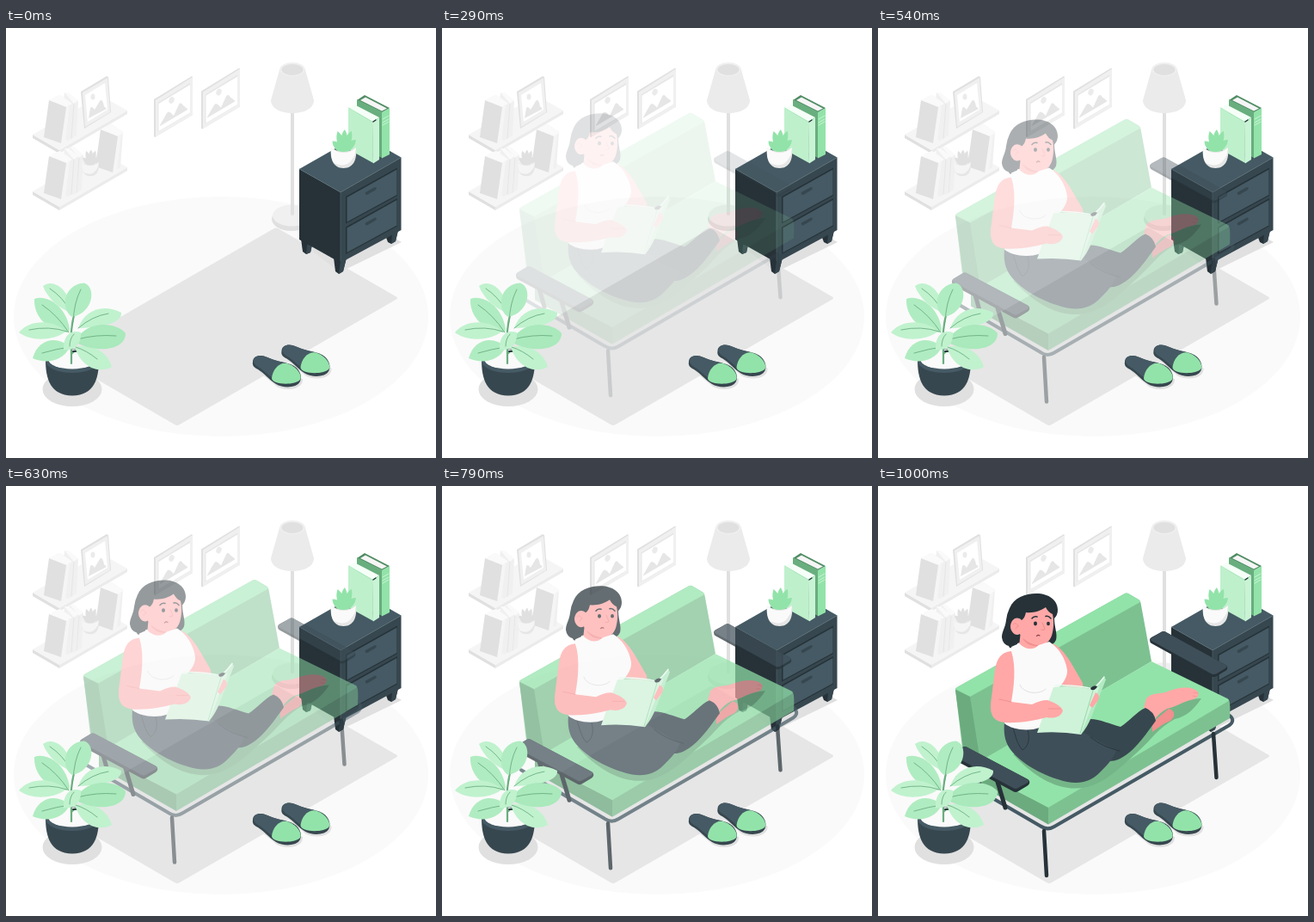
An HTML page with a canvas that plays this animation: 500 by 500 pixels, repeating every 1040 ms.

```html
<!DOCTYPE html>
<html lang="en">
<head>
<meta charset="utf-8">
<title>Reading on the sofa</title>
<style>
html, body { margin: 0; width: 100%; height: 100%; overflow: hidden; background: #fff; }
canvas { display: block; width: 500px; height: 500px; }
</style>
</head>
<body>
<canvas id="stage"></canvas>
<script>
const SIZE = 500, LOOP = 1040, FPS = 24, LAST = 24, DROP = 30;
const scale = window.devicePixelRatio || 1;
const stage = document.getElementById('stage');
const layer = document.createElement('canvas');
for (const c of [stage, layer]) c.width = c.height = SIZE * scale;
const view = stage.getContext('2d'), group = layer.getContext('2d');
let g = view;

const INK = '#263238', SLATE = '#37474f', STEEL = '#455a64', DENIM = '#3f4f59';
const GREEN = '#92e3a9', MOSS = '#7dc191', SKIN = '#ffa8a7', BLUSH = '#f28f8f';

function fill(d, color) {
  g.fillStyle = color;
  g.fill(new Path2D(d));
}

function line(d, color, width = 1) {
  g.strokeStyle = color;
  g.lineWidth = width;
  g.lineCap = g.lineJoin = 'round';
  g.stroke(new Path2D(d));
}

function oval(x, y, rx, ry, color, turn = 0) {
  g.fillStyle = color;
  g.beginPath();
  g.ellipse(x, y, rx, ry, turn, 0, Math.PI * 2);
  g.fill();
}

function at(x, y, draw) {
  g.save();
  g.translate(x, y);
  draw();
  g.restore();
}

// ---- wall ----

function picture() {
  fill('M172 83 L216 56 L217 57 V101 L173 127 L172 126Z', '#e0e0e0');
  fill('M174 84 L217 57 V101 L174 126.5Z', '#f0f0f0');
  fill('M176.5 87 L214 64 V99 L176.5 121Z', '#e6e6e6');
  fill('M177.5 88 L214 66 V98.5 L177.5 120Z', '#fff');
  fill('M179 113 L187 99 Q189 96 192 99 L195 102 L201 89 Q203 85 206 90 L211 94 V95 L179 114Z', '#e6e6e6');
  oval(192.5, 84, 3, 4, '#ebebeb', 0.4);
}

function shelf() {
  fill('M31 124 L62 142 V146 L31 128Z', '#e0e0e0');
  fill('M62 142 L141 96 V100 L62 146Z', '#ebebeb');
  fill('M31 124 L110 78.5 L141 96 L62 142Z', '#f5f5f5');
}

function farBook() {
  fill('M68 75 L84 85 L82 125 L72 131 L63 125Z', '#f0f0f0');
  fill('M68 75 L73 75 L84 84 L79 88Z', '#fafafa');
  line('M79 88 L76 128', '#e6e6e6');
}

function books() {
  fill('M57 80 L63 78 L76 87 L73 128 L64 133 L51 125Z', '#f0f0f0');
  fill('M57 80 L63 78 L76 87 L70 91Z', '#fafafa');
  fill('M50 84 L57 80 L77 88 L70 92Z', '#fafafa');
  fill('M70 92 L74 89 L69 131 L64 134Z', '#f5f5f5');
  fill('M50 84 L70 92 L64 134 L44 127Z', '#e0e0e0');
}

function wall() {
  picture();
  at(55, -9.5, picture);
  shelf();
  farBook();
  books();
  fill('M87 74 L117 56 L119 57 L122 98 L91 117Z', '#e0e0e0');
  fill('M89 75 L118 58 L121 98 L92 115Z', '#f0f0f0');
  fill('M92 78 L115 64 L118 95 L95 109Z', '#fff');
  fill('M96 105 L98 93 Q100 90 103 95 L109 85 Q112 81 114 91 L117 94Z', '#e6e6e6');
  oval(101, 80, 2.5, 3.5, '#ebebeb');
  at(0, 66, shelf);
  at(60, 34, books);
  at(6, 63, farBook);
  at(0, 65, farBook);
  at(0, 65, books);
  succulent(98, 162, 0.68, '#e0e0e0', '#f5f5f5', '#e6e6e6');
}

// ---- furniture ----

function succulent(x, y, size, leaf, pot, shade) {
  g.save();
  g.translate(x, y);
  g.scale(size, size);
  for (const [turn, len] of [[-0.8, 18], [0.8, 20], [-0.28, 25], [0.36, 26], [0.05, 26]]) {
    g.save();
    g.translate(0, -4);
    g.rotate(turn);
    fill(`M-2 3 C-6 ${-len * 0.4} -4 ${-len * 0.8} 0 ${-len} C4 ${-len * 0.8} 6 ${-len * 0.4} 2 3Z`, leaf);
    g.restore();
  }
  fill('M-14.5 -9 C-16 4 -12 15 0 15 C12 15 16 4 14.5 -9 Q0 1 -14.5 -9Z', shade);
  fill('M-14.5 -9 C-15 -1 -14 5 -11 9 C-3 13 5 12 9 6 L13 0 L14.5 -9 Q8 -3 0 -3 Q-8 -3 -14.5 -9Z', pot);
  g.restore();
}

function lamp() {
  oval(332, 222, 23, 14, '#e0e0e0');
  oval(332, 218, 22, 12.5, '#f0f0f0');
  fill('M331 90 H335 V217 Q333 219 331 217Z', '#e0e0e0');
  fill('M318.5 47 L308 84 C308 104 358 104 358 84 L347.5 47Z', '#ebebeb');
  oval(333, 48, 14.5, 8, '#f0f0f0');
  oval(333, 48.5, 12.5, 6.5, '#e0e0e0');
}

function drawer() {
  fill('M395 196 L455 162.5 V195 L395 227.5Z', INK);
  fill('M396.5 197 L454.5 164.5 V194 L396.5 225.5Z', STEEL);
  fill('M418 191 L429 185 Q432 185 430 188 L420 194 Q417 194 418 191Z', SLATE);
}

function dresser() {
  fill('M344 250 L388 284 L460 249 L412 222Z', '#e0e0e0');
  fill('M343 245 L356 252 L354 261 L349 263 L345 260Z', INK);
  fill('M350 252 L356 252 L354 261 L349 263Z', SLATE);
  fill('M381 267 H396 L392 283 L387 286 L383 283Z', INK);
  fill('M389 270 L396 267 L392 283 L387 286Z', SLATE);
  fill('M441 241 L456 234 L453 248 L448 251 L444 249Z', INK);
  fill('M449 240 L456 236 L453 248 L448 251Z', SLATE);
  fill('M341 164 L389 191 V273 L341 246Z', INK);
  fill('M389 191 L459.5 150.5 V235 L389 273Z', SLATE);
  fill('M341 164 L412 123.5 L459.5 150.5 L389 191Z', STEEL);
  line('M341.5 164 L389 191 L459 151 M389 191 V271', '#54686f', 0.6);
  drawer();
  at(0, 35.5, drawer);

  fill('M408 84 L437 98 V151 L408 136Z', '#69ae7e');
  fill('M437 98 L446 93 V147 L437 151.5Z', GREEN);
  fill('M408 84 L417 78 L446 93 L437 98Z', '#4f8c63');
  fill('M412 84 L418 80.5 L443 93.5 L437 96.5Z', '#f5f5f5');
  line('M408.5 84 L437 98', '#69ae7e', 1.2);
  line('M438 106 L445 102 M438 110 L445 106 M438 113 L445 109', '#d0f5da', 0.9);
  fill('M398 93 L426 109 L427 157 L398 141Z', '#bff0cc');
  fill('M426 109 L434 104 V153 L427 157.5Z', '#c9f3d5');
  fill('M398 93 L405 89 L434 104 L426 109Z', '#f5fff8');
  line('M398.5 93 L426 109 L433 105', '#a8e8ba', 1);
  line('M427 109 L430 107', INK, 1.4);
  succulent(392.5, 148, 1, GREEN, '#fafafa', '#e6e6e6');
}

function room() {
  g.fillStyle = '#fff';
  g.fillRect(0, 0, SIZE, SIZE);
  oval(250, 335.5, 241, 139.5, '#fafafa');
  wall();
  fill('M311 233.5 Q314 231.5 317 233.5 L453 312 Q457 314 453 316 L202 461 Q199 463 196 461 L60 382 Q56 380 60 378Z', '#e6e6e6');
  lamp();
  dresser();
}

// ---- sofa and reader ----

function sofa() {
  // far armrest
  line('M347 200 L352 232 M378 210 L374 244', INK, 5);
  fill('M316 179 Q316 177 318 176 L329 170 Q332 168 335 170 L404 208 Q407 210 406 213 Q405 215 402 216 L394 221 Q390 223 387 221 L318 183 Q316 182 316 179Z', INK);
  fill('M318 177 L329 170 Q332 168 335 170 L404 208 Q407 210 404 212 L394 218 Q390 220 387 218 L318 180 Q316 178 318 177Z', DENIM);

  // backrest
  fill('M90 237 Q90 235 92 234 L287 125 Q289 124 291 125 L303 132 Q305 133 305.5 136 L318 204 L120 320 L98 304Z', MOSS);
  fill('M90 236 Q90 235 92 234 L287 125 Q289 124 291 125 L304 133 L305 135 L107 245Z', GREEN);
  fill('M90 237 L107 245 L119 321 L100 310Z', '#6bab7e');

  // seat, with the rail a little below it
  line('M92 339 L189 395.5 Q197 401 205 396 L408 278.5 Q416 273 409 267', STEEL, 4);
  fill('M108 328 L198 373 V393.5 L108 342Z', '#6bab7e');
  fill('M198 373 L408 249 Q410 252 409 270 L198 393.5Z', MOSS);
  fill('M318 204 L406 247 Q410 249 406 251 L198 374 L108 326Z', GREEN);
  line('M193 401 L196 453 M390 288 L393.5 339', INK, 4.5);

  // near armrest
  line('M112 325 L119 350 M139 344 L148 374', INK, 5);
  fill('M86 313 Q86 311 88 310 L98 304 Q101 302 104 304 L174 341 Q177 343 176 346 Q175 348 173 349 L163 355 Q160 357 157 355 L88 318 Q86 317 86 313Z', INK);
  fill('M88 310 L98 304 Q101 302 104 304 L174 341 Q177 343 174 345 L163 351 Q160 353 157 351 L88 314 Q85 312 88 310Z', DENIM);
}

function legs() {
  fill('M157 312 C183 340 213 357 243 350 C264 345 280 329 300 311 C318 295 326 281 345 271 C359 268 367 260 376 247 L330 250 L250 310Z', '#75b688');
  fill('M319 275 L338 259 C346 261 346 268 340 273 C332 276 326 281 319 286Z', BLUSH);
  fill('M312 247 C319 240 326 242 334 240 C345 235 358 233 367 236 C375 239 374 246 367 248 C356 250 346 257 336 259 C330 262 326 266 322 271 L309 258Z', SKIN);
  line('M367 240 L372 241 M366 244 L370 245', BLUSH, 0.7);
  fill('M235 273 L247 271 C258 271 270 277 282 280 C292 274 301 262 311 258 Q321 262 323 273 C312 288 303 301 292 310 C283 317 277 320 268 320 L230 300Z', SLATE);
  fill('M147 275 C158 282 176 284 188 279 L240 287 C252 294 264 302 277 307 C274 317 266 325 258 333 C246 346 229 348 209 341 C183 333 162 318 153 305 C147 296 146 286 147 275Z', DENIM);
  line('M247 292 C257 300 268 305 281 308', INK, 0.8);
  line('M157 281 C160 290 161 299 168 307 C175 303 177 294 174 284', INK, 0.8);
}

function head() {
  fill('M153 142 C158 130 171 125 184 125 C199 125 209 133 209 144 Q209 150 205 154 C205 164 209 172 207 179 Q203 187 196 184 L172 180 L162 183 Q162 188 159 190 Q157 189 157 187 Q153 190 152 186 Q145 184 144 176 C144 169 148 165 149 156 Q150 148 153 142Z', INK);
  fill('M166 168 L164 187 C171 192 182 192 188 185 L186 174Z', SKIN);
  fill('M168 177 C172 184 179 187 186 186 L187 183Z', BLUSH);
  fill('M167 156 C171 153 171 150 172 147 C181 148 189 145 195 141 Q198 147 203 149 C205 158 204 168 202 174 C199 182 193 186 186 185 C177 184 169 179 165 172 C160 175 154 170 154 163 C155 154 162 151 167 156Z', SKIN);
  line('M157 161 Q160 157 163 163 M160 166 Q161 163 163 163', BLUSH, 0.9);
  oval(183, 160, 2, 2.4, INK);
  oval(198, 160, 1.9, 2.3, INK);
  line('M179 154 Q181 151 185 152 M195 151.5 Q198 150.5 201 154', INK, 1.5);
  line('M191 159 L194 166 Q193 168 190 167', BLUSH, 1.1);
  line('M184.5 174.5 Q186 172.5 188 174', '#8d3f48', 1.1);
}

function reader() {
  legs();
  fill('M198 181 C210 184 220 197 227 210 L238 229 L239 238 L214 232 L209 195Z', SKIN);
  head();
  fill('M155 187 L164 183 C172 191 181 191 187 185 L199 181 C210 188 218 200 220 214 C221 224 211 234 206 239 L188 281 C174 286 155 283 147 276 L151 225 C154 210 158 202 155 187Z', '#fafafa');
  line('M165 231 C169 242 188 243 195 236', '#e0e0e0', 1);
  book();
  fill('M155 192 C143 193 138 201 136 214 L131 253 C130 267 135 274 147 275 C163 276 181 273 196 269 C206 271 213 268 215 261 C211 254 205 252 197 249 C190 249 185 251 179 254 L155 251 C158 234 161 211 155 192Z', SKIN);
  line('M155 251 L141 248 M198 259 L212 259', BLUSH, 0.9);
}

function book() {
  fill('M247 238 L255 239 Q258 249 252 257 L246 263 L242 259Z', SKIN);
  fill('M250 237 L263 222 L265 225 L248 269 Q243 281 236 289 L231 286Z', '#b2eac2');
  fill('M204 234 Q228 231 250 237 L258 233 Q246 262 236 289 Q211 285 185 287Z', '#cff3d9');
  line('M206 232 Q229 231 250 236 Q258 229 263 222', '#e9fbef', 1.5);
  line('M250 238 L235 288', '#8fd6a3', 0.9);
  fill('M247 235 Q251 231 255 233 Q253 238 248 237Z', INK);
  fill('M253 240 Q259 243 256 249 L249 258 L246 255Z', SKIN);
}

// ---- foreground ----

function slipper() {
  fill('M290 393 L345 408 C346 420 327 423 315 417 L296 401Z', '#e0e0e0');
  fill('M287 388 C287 381 296 379 304 383 C312 387 322 388 331 391 C341 395 345 404 342 411 C338 419 322 419 314 414 C306 409 301 402 293 397 C289 395 286 393 287 388Z', SLATE);
  fill('M288 387 C288 381 296 379 304 383 C312 387 322 388 328 391 L312 409 C305 404 300 398 293 394 Q288 391 288 387Z', STEEL);
  fill('M309 407 C310 397 318 388 327 390 C337 393 345 403 342 409 C338 414 322 415 314 412 Q309 410 309 407Z', GREEN);
}

function leaf(shape, vein, color) {
  fill(shape, color);
  line(vein, '#6cae82', 0.9);
}

function plant() {
  const pale = '#c0f2ce', mid = '#b0ecc1';
  oval(77, 420, 34.5, 20, '#e0e0e0');
  fill('M46 386 C46 407 51 427 77 427.5 C103 427 108 407 108 386Z', SLATE);
  oval(77, 387, 31, 14, STEEL);
  oval(77, 385, 28, 11.5, '#fafafa');
  line('M76 390 V352 Q77 341 80 330 M76 379 Q80 374 85 376', '#69ae7e', 2.2);
  line('M78 376 L85 375.5', INK, 1.8);
  leaf('M75 331 C62 326 48 314 43 300 C54 291 72 302 77 327Z', 'M51 303 Q66 313 74 328', pale);
  leaf('M77 336 C63 328 66 298 91 296.5 C105 301 102 331 77 336Z', 'M87 304 Q79 319 78 342', mid);
  leaf('M73 354 C47 352 32 335 33 315 C47 309 70 323 74 350Z', 'M42 322 Q60 334 73 354', mid);
  leaf('M70 353 C55 339 28 338 15 354 C28 364 52 365 70 353Z', 'M27 351 Q50 346 71 353', pale);
  leaf('M84 349 C91 328 113 320 134 331 C135 343 112 348 84 349Z', 'M84 349 Q100 335 119 332', pale);
  leaf('M74 371 C60 357 37 361 31 384 C46 391 66 388 74 371Z', 'M42 378 Q59 373 74 371', mid);
  leaf('M80 371 C98 367 117 374 123 394 C109 402 88 396 80 371Z', 'M81 371 Q94 375 106 385', pale);
  leaf('M82 362 C94 340 128 341 139 355 C139 374 108 379 82 366Z', 'M83 362 Q105 356 128 358', '#a9e9bb');
  leaf('M67 374 C66 357 76 350 87 354 C88 367 80 376 67 374Z', 'M74 370 Q74 361 79 356', pale);
}

function foreground() {
  at(33.5, -12.5, slipper);
  slipper();
  plant();
}

// ---- motion ----

// cubic-bezier(.42, 0, 1, 1)
function easeIn(x) {
  let lo = 0, hi = 1;
  for (let i = 0; i < 24; i++) {
    const s = (lo + hi) / 2, r = 1 - s;
    if (1.26 * s * r * r + 3 * s * s * r + s * s * s < x) lo = s;
    else hi = s;
  }
  return lo * lo * (3 - 2 * lo);
}

function render(step) {
  const k = easeIn(Math.min(1, (step + 0.5) / LAST));
  g = group;
  g.setTransform(1, 0, 0, 1, 0, 0);
  g.clearRect(0, 0, layer.width, layer.height);
  g.setTransform(scale, 0, 0, scale, 0, (k - 1) * DROP * scale);
  sofa();
  reader();

  g = view;
  g.setTransform(scale, 0, 0, scale, 0, 0);
  room();
  g.globalAlpha = k;
  g.drawImage(layer, 0, 0, SIZE, SIZE);
  g.globalAlpha = 1;
  foreground();
}

let shown = -1;
function tick() {
  const t = performance.now() % LOOP;
  const step = Math.min(LAST, Math.floor((t + 5) * FPS / 1000));
  if (step !== shown) render(shown = step);
  requestAnimationFrame(tick);
}
tick();
</script>
</body>
</html>
```
